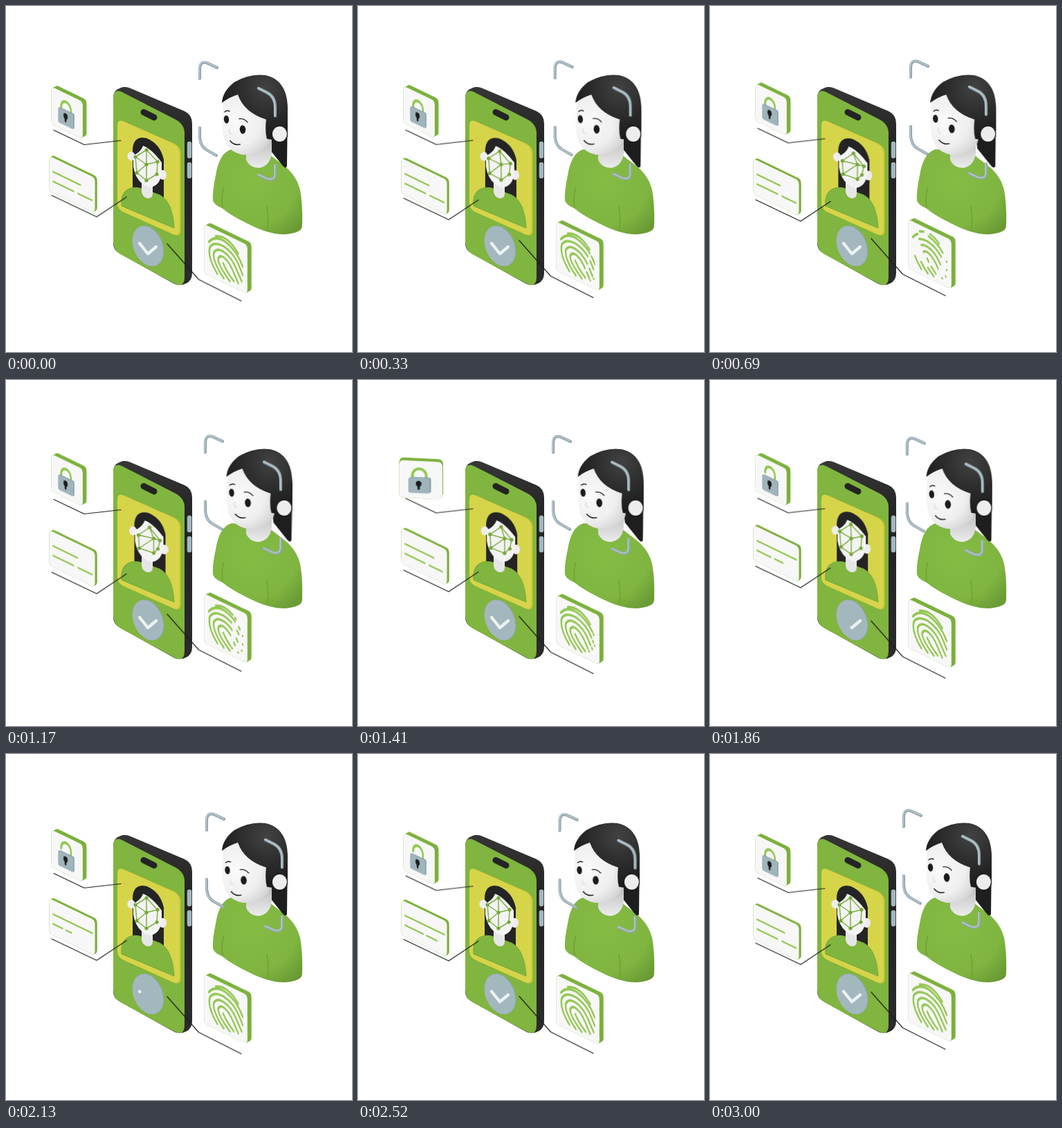
Animation of 500 by 500 pixels, one loop 3.03 s. Source, as an HTML page:

```html
<!DOCTYPE html>
<html lang="en">
<head>
<meta charset="utf-8">
<title>Face recognition</title>
<style>
  html, body { margin: 0; width: 100%; height: 100%; overflow: hidden; background: #fff; }
  svg { display: block; width: 100vw; height: 100vh; }
  .line { fill: none; stroke-linecap: round; stroke-linejoin: round; }
  .wire { stroke: #1f1f1f; stroke-width: 1.2; }
  .green { stroke: #92c750; }

  /* Half a swing each way; --a and --b are the end heights. */
  .bob { animation: bob 1515ms cubic-bezier(.37, 0, .63, 1) infinite alternate; }
  @keyframes bob {
    from { transform: translateY(var(--a)); }
    to { transform: translateY(var(--b)); }
  }

  .loop { animation: 3030ms ease-in-out infinite; }
  .head { --x: 6.5px; --y: 0px; animation-name: turn; }
  .avatar { --x: 2.5px; --y: 1px; animation-name: turn; }
  @keyframes turn {
    0%, 67%, 100% { transform: none; }
    26.4%, 39.6% { transform: translate(var(--x), var(--y)); }
  }

  .features { animation-name: look; }
  @keyframes look {
    0%, 100% { transform: none; }
    22%, 54% { transform: translate(1px, -1px); }
    70%, 84% { transform: translate(1.5px, 4px); }
  }

  .scan { animation-name: scan; }
  @keyframes scan {
    0%, 53%, 99%, 100% { transform: none; }
    22.8% { transform: translate(10px, -2px); animation-timing-function: linear; }
    30% { transform: translate(10.5px, -2px); animation-timing-function: linear; }
    38.6% { transform: translate(8px, -.5px); animation-timing-function: ease-out; }
    70.3% { transform: translate(10px, 5px); animation-timing-function: linear; }
    83.2% { transform: translate(11.5px, 6px); }
  }

  .tick { stroke-dasharray: 100 300; animation-name: tick; }
  @keyframes tick {
    0%, 57%, 81%, 100% { stroke-dashoffset: 0; }
    66% { stroke-dashoffset: -110; }
    66.01%, 68% { stroke-dashoffset: 110; }
    70.3% { stroke-dashoffset: 98; }
  }

  .row1 { animation-name: row1; }
  @keyframes row1 {
    0%, 100% { stroke-dasharray: 55 200; }
    16%, 24% { stroke-dasharray: 46 200; }
    38.6% { stroke-dasharray: 49 200; }
    60%, 84% { stroke-dasharray: 79 200; }
  }
  .row2 { animation-name: row2; }
  @keyframes row2 {
    0%, 42%, 96%, 100% { stroke-dasharray: 41 9 28 200; }
    53.5% { stroke-dasharray: 37 8 23 200; }
    69%, 72% { stroke-dasharray: 19 7 11 200; }
    83.2% { stroke-dasharray: 36 7 21 200; }
  }

  .ridge { animation-name: ridge; }
  @keyframes ridge {
    0%, 5%, 52%, 100% { stroke-dasharray: 100 0 0 0; }
    22.8% { stroke-dasharray: 16 28 40 16; }
    38.6% { stroke-dasharray: 72 12 4 12; }
  }

  .shackle { animation-name: shackle; }
  @keyframes shackle {
    0%, 40%, 100% { transform: none; stroke-dasharray: 100 100; }
    60%, 84% { transform: translateY(-3px); stroke-dasharray: 84 100; }
  }
</style>
</head>
<body>
<svg viewBox="0 0 500 500">
  <defs>
    <radialGradient id="shirt" gradientUnits="userSpaceOnUse" cx="355" cy="250" r="95">
      <stop offset="0" stop-color="#85bc44"/><stop offset=".7" stop-color="#7fb540"/><stop offset="1" stop-color="#6b9b35"/>
    </radialGradient>
    <radialGradient id="skin" gradientUnits="userSpaceOnUse" cx="332" cy="168" r="60">
      <stop offset="0" stop-color="#fafafa"/><stop offset=".6" stop-color="#efefef"/><stop offset="1" stop-color="#cfcfcf"/>
    </radialGradient>
    <radialGradient id="hair" gradientUnits="userSpaceOnUse" cx="376" cy="118" r="72">
      <stop offset="0" stop-color="#424242"/><stop offset=".5" stop-color="#2e2e2e"/><stop offset="1" stop-color="#1b1b1b"/>
    </radialGradient>
    <linearGradient id="neck" x1="0" y1="0" x2="0" y2="1">
      <stop offset="0" stop-color="#bdbdbd"/><stop offset="1" stop-color="#ececec"/>
    </linearGradient>
    <linearGradient id="edge" x1="0" y1="0" x2="0" y2="1">
      <stop offset="0" stop-color="#363636"/><stop offset=".3" stop-color="#232323"/><stop offset="1" stop-color="#2b2b2b"/>
    </linearGradient>
  </defs>

  <!-- person -->
  <path fill="url(#shirt)" d="M326 207Q308 212 303 245Q298 268 299 281Q301 288 312 292Q325 303 352 316Q380 330 402 330Q428 328 428 318Q429 286 425 266Q420 245 402 231L380 214L347 208Z"/>
  <g class="line" stroke="#5f8f2c" stroke-width="1.6" opacity=".5">
    <path d="M314 264Q311 280 313 291"/><path d="M377 290Q380 308 378 323"/>
  </g>
  <g class="head loop">
    <path fill="#1e1e1e" d="M370 112Q407 118 407 152L406 231Q405 236 400 231L380 206Z"/>
  </g>
  <path fill="url(#neck)" d="M347 200V222Q352 234 366 234Q381 231 384 214V190Z"/>
  <g class="head loop">
    <path fill="url(#skin)" d="M314 140Q310 180 316 194Q322 211 342 215Q366 216 380 198L390 160Q380 120 340 120Q318 124 314 140Z"/>
    <path fill="url(#hair)" d="M312 140Q313 123 330 110Q352 97 375 100C396 104 407 122 407 147V190L394 172Q386 171 384 193L377 192Q374 181 376 164Q344 154 335 128Q322 132 312 140Z"/>
    <ellipse cx="395.500" cy="185" rx="10.500" ry="11" fill="#ededed"/>
    <g class="features loop">
      <ellipse cx="318.500" cy="164" rx="3.700" ry="5.800" fill="#1c1c1c" transform="rotate(-6 318 164)"/>
      <ellipse cx="342" cy="178.500" rx="4.300" ry="6.300" fill="#1c1c1c" transform="rotate(-6 342 178)"/>
      <g class="line" stroke="#2a2a2a" stroke-width="1.400">
        <path d="M316 153Q319 150 323 152"/><path d="M337 163Q344 162 349 168"/>
        <path stroke-width="1.800" d="M324 195Q330 202 338 200"/>
      </g>
      <path class="line" stroke="#e4e4e4" stroke-width="2" d="M323 178Q321 184 326 185"/>
    </g>
  </g>
  <g class="scan loop">
    <g class="line" stroke="#93a8af" stroke-width="4.200"><use href="#frame"/></g>
    <g class="line" stroke="#b9cad0" stroke-width="1.500" transform="translate(-.7 -.6)">
      <path id="frame" d="M280 105V92Q280 78 292 83L305 89M280 176V190Q281 203 290 208L304 216M365 119L377 125Q389 131 389 146V159M389 230V243Q389 253 378 250L365 244"/>
    </g>
  </g>

  <!-- phone -->
  <path fill="url(#edge)" d="M155 132Q155 122 165 118.500Q172 115.500 180 119L258 152Q269 157 269 170V386Q269 397 260 401Q252 405 244 402L165 358Q155 353 155 343Z"/>
  <path fill="#80b53f" d="M155 133Q155 119 167 124L245 164Q258 171 258 184V392Q258 407 245 402L166 359Q155 353 155 341Z"/>
  <g class="line">
    <path stroke="#232323" stroke-width="9" d="M199 153.500L214 161"/>
    <path stroke="#a3b7be" stroke-width="6.500" d="M265 199V217M265 229V246"/>
  </g>
  <path fill="#c2bd36" transform="translate(1 0)" d="M161 173Q161 163 170 167L243 199Q252 204 252 213V324Q252 334 243 331L171 299Q161 295 161 286Z"/>
  <path fill="#d6d449" d="M161 173Q161 163 170 167L242 199Q251 204 251 213V323Q251 333 242 330L171 298Q161 294 161 285Z"/>
  <g class="avatar loop">
    <path fill="#242424" d="M183 264V206Q185 187 203 191Q223 199 228 222V285L214 280Z"/>
  </g>
  <path fill="#80b53f" stroke="#75a83a" d="M167 289Q165 271 176 265Q184 260 197 264L222 273Q241 283 243 321Z"/>
  <path fill="#e6e6e6" d="M196 250V269Q198 277 205 278Q212 278 212 271V250Z"/>
  <g class="avatar loop">
    <ellipse cx="181" cy="217" rx="5.500" ry="6.500" fill="#ededed"/>
    <ellipse cx="226.500" cy="244" rx="5.500" ry="7" fill="#ededed"/>
    <path fill="#f3f3f3" d="M184 216Q195 211 198 202Q210 206 225 226V240Q223 261 207 262Q188 256 184 232Z"/>
    <path id="edges" class="line" stroke="#7fb141" stroke-width="1.500"/>
    <path id="nodes" class="line" stroke="#75a83a" stroke-width="5.200"/>
  </g>
  <g transform="matrix(.8 .28 0 1 205 347)">
    <circle r="28.500" cx="1" cy="-.5" fill="#8ea4ab"/>
    <circle r="28" fill="#a3b7be"/>
  </g>
  <path class="tick loop line" pathLength="100" stroke="#eef1f1" stroke-width="4.400" d="M193 343L205 358L217 348"/>

  <!-- connectors -->
  <g class="line wire">
    <path class="bob" style="--a:0px;--b:-9px;animation-delay:-2895ms" d="M69 179.500L113 200.500L166 194.500"/>
    <path class="bob" style="--a:6px;--b:-7px;animation-delay:-2280ms" d="M66 274L131 305L174 276.500"/>
    <path class="bob" style="--a:-7px;--b:8px;animation-delay:-2260ms" d="M233 343L278.500 394.500L340 425.500"/>
  </g>

  <!-- cards -->
  <g class="bob" style="--a:0px;--b:-11px">
    <g id="lock">
      <g class="face">
        <path class="shackle loop line green" pathLength="100" stroke-width="4" d="M8 3V-5A10 10 0 0 0 -12 -5V3"/>
        <rect x="-16" y="-3.500" width="31" height="22" rx="3" fill="#8299a2"/>
        <rect x="-18" y="-2.500" width="31" height="22" rx="3" fill="#a0b4bc"/>
        <circle cx="-3" cy="6" r="4.200" fill="#1d1d1d"/>
        <path class="line" stroke="#1d1d1d" stroke-width="3.400" d="M-3 7V13"/>
      </g>
    </g>
  </g>
  <g class="bob" style="--a:4px;--b:-8px;animation-delay:-2430ms">
    <g id="text">
      <g class="face line green" stroke-width="2.500">
        <path class="row1 loop" d="M-38 -5H41"/>
        <path class="row2 loop" d="M-38 9H41"/>
      </g>
    </g>
  </g>
  <g class="bob" style="--a:-7.3px;--b:4.3px;animation-delay:-2130ms">
    <g id="print">
      <g class="face line green" stroke-width="3.400">
        <path class="ridge loop" pathLength="100" d="M-20 -26Q4 -36 25 -17"/>
        <path class="ridge loop" pathLength="100" d="M-34 -13Q-22 -27 -2 -25Q22 -21 34 -1"/>
        <path class="ridge loop" pathLength="100" d="M-17 27Q-37 10 -32 -6Q-24 -18 -4 -17Q18 -14 28 2L34 11"/>
        <path class="ridge loop" pathLength="100" d="M-4 29Q-27 12 -24 -1Q-18 -11 -4 -9Q12 -7 22 8L32 21"/>
        <path class="ridge loop" pathLength="100" d="M8 29Q-17 13 -15 4Q-11 -3 -3 -1Q8 2 16 14L25 26"/>
        <path class="ridge loop" pathLength="100" d="M-5 8Q2 18 16 26"/>
      </g>
    </g>
  </g>
</svg>
<script>
const LOOP = 3030, REST = 44, SLICES = 9;
const $ = id => document.getElementById(id);
const clamp = v => Math.min(1, Math.max(0, v));

function rect(parent, w, h, fill, before = null) {
  const r = document.createElementNS('http://www.w3.org/2000/svg', 'rect');
  const attrs = { x: -w / 2, y: -h / 2, width: w, height: h, rx: 6, fill };
  for (const k in attrs) r.setAttribute(k, attrs[k]);
  return parent.insertBefore(r, before);
}

// A thick card standing upright on the isometric ground.
function makeCard(id, cx, cy, w, h, depth) {
  const g = $(id), face = g.querySelector('.face');
  const slices = Array.from({ length: SLICES }, () => rect(g, w, h, '#7cb13d', face));
  const sheet = rect(face, w, h, '#f7f7f7', face.firstChild);
  sheet.setAttribute('stroke', 'none');
  const back = rect(g, w, h, '#d7d7d7');
  const card = { cx, cy, depth, slices, face, back };
  poseCard(card, REST);
  return card;
}

function poseCard({ cx, cy, depth, slices, face, back }, deg) {
  const a = deg * Math.PI / 180, c = Math.cos(a), s = Math.sin(a);
  const at = k => `matrix(${c} ${s / 2} 0 1 ${cx - s * depth * k} ${cy + c * depth * k / 2})`;
  slices.forEach((r, i) => r.setAttribute('transform', at(i / (SLICES - 1) - .5)));
  face.setAttribute('transform', at(.5));
  back.setAttribute('transform', at(-.5));
  face.style.display = c > 0 ? '' : 'none';
  back.style.display = c > 0 ? 'none' : '';
}

const lock = makeCard('lock', 91, 153, 63, 54, 8);
makeCard('text', 97, 257, 92, 51, 4.5);
makeCard('print', 320.5, 364, 87, 71, 8.5);

// Face mesh: x, y and the drift at full head turn.
const mesh = [
  [203, 208, 2, 4], [187, 218, 2, 5], [219, 225, 1, 6], [189, 241, 1, 1],
  [218, 243, -1, 0], [203, 252, 8, -3], [203, 229, 8, -1]
];
const links = [[0, 1], [0, 2], [1, 3], [2, 4], [3, 5], [4, 5], [6, 0], [6, 1], [6, 2], [6, 3], [6, 5]];

function drawMesh(turn) {
  const p = mesh.map(([x, y, dx, dy]) => `${x + dx * turn} ${y + dy * turn}`);
  $('edges').setAttribute('d', links.map(([i, j]) => `M${p[i]}L${p[j]}`).join(''));
  $('nodes').setAttribute('d', p.map(q => `M${q}h.01`).join(''));
}

const smooth = p => p * p * (3 - 2 * p);
const cubic = p => p < .5 ? 4 * p ** 3 : 1 - 4 * (1 - p) ** 3;
const span = (t, a, b) => clamp((t - a) / (b - a));

const start = performance.now();
function draw() {
  const t = (performance.now() - start) % LOOP;
  poseCard(lock, REST - 360 * cubic(span(t, 1200, 1905)));
  drawMesh(smooth(span(t, 0, 800)) - smooth(span(t, 1200, 2030)));
  requestAnimationFrame(draw);
}
draw();
</script>
</body>
</html>
```
